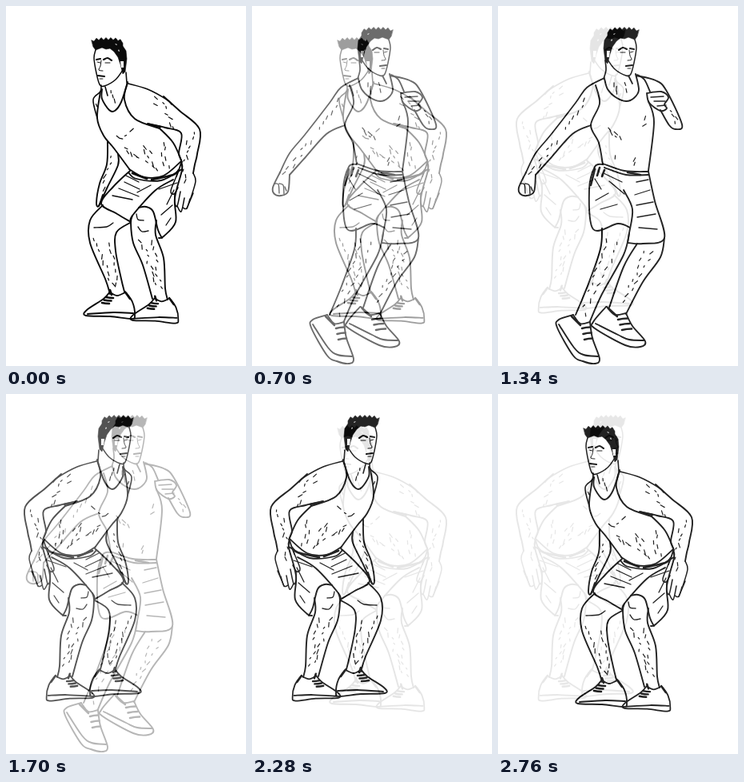
An HTML page for the animation above (2.82 s loop, 300x450 px).

```html
<!DOCTYPE html>
<html lang="en">
<head>
<meta charset="utf-8">
<title>Side hop exercise</title>
<style>
html, body { margin: 0; width: 100%; height: 100%; overflow: hidden; background: #fff; }
svg { display: block; width: 100vw; height: 100vh; }
.ink path { fill: none; stroke: #0b0b0b; stroke-linecap: round; stroke-linejoin: round; }
.ink .solid { fill: #0b0b0b; stroke-width: .6; }
.ink .gap { fill: #fff; stroke: none; }
</style>
</head>
<body>
<svg id="stage" viewBox="0 0 300 450">
  <defs id="defs"></defs>
  <use id="under"/>
  <use id="over"/>
</svg>
<script>
let seed = 7;
const rand = () => (seed = seed * 16807 % 2147483647) / 2147483647;

// Catmull-Rom spline through "x,y x,y ..."
function curve(s) {
  const p = s.split(' ').map(q => q.split(',').map(Number));
  let d = 'M' + p[0];
  for (let i = 0; i < p.length - 1; i++) {
    const a = p[i], b = p[i + 1], before = p[i - 1] || a, after = p[i + 2] || b;
    const c1 = a.map((v, k) => v + (b[k] - before[k]) / 6);
    const c2 = b.map((v, k) => v - (after[k] - a[k]) / 6);
    d += `C${c1} ${c2} ${b}`;
  }
  return d;
}

// Strokes of one weight, separated by "|"
const ink = (width, strokes) => strokes.split('|')
  .map(s => `<path d="${curve(s)}" stroke-width="${width}"/>`).join('');

// Short muscle marks scattered along a line
function marks(x, y, x2, y2, spread, count) {
  const angle = Math.atan2(y2 - y, x2 - x);
  let d = '';
  for (let i = 0; i < count; i++) {
    const k = (i + .5) / count, off = (rand() * 2 - 1) * spread;
    const turn = angle + rand() - .5, len = 2 + rand() * 4;
    const px = x + (x2 - x) * k - Math.sin(angle) * off;
    const py = y + (y2 - y) * k + Math.cos(angle) * off;
    d += `M${px} ${py}l${Math.cos(turn) * len} ${Math.sin(turn) * len}`;
  }
  return `<path d="${d}" stroke-width="1.2"/>`;
}

function laces(x, y, dx, dy, len, tilt) {
  let d = '';
  for (let i = 0; i < 3; i++) d += `M${x + dx * i} ${y + dy * i}q${len / 2} ${tilt} ${len} ${tilt}`;
  return `<path d="${d}" stroke-width="2.6"/>`;
}

function hair() {
  let top = '';
  for (let x = 107, i = 0; x <= 148; x += 3, i++) {
    top += `${x},${39.5 + i % 2 * 3 + 5 * ((x - 126) / 21) ** 4} `;
  }
  return `<path class="solid" d="M${top}146,50 150,56 151,66 149,82 146,85 143,73 140,64 135,57 130,53 125,54 120,52 112,55 109,51Z"/>
    <path class="gap" d="M143,69 147,69 147,77 144,77ZM136,47l3,1l-1,1ZM141,54l1,3l-2,-1Z"/>`;
}

function face() {
  return hair() +
    ink(1.5, '112,55 110,65 113,84 117,98 123,100 137,92 146,80') +
    ink(2.1, '113,67 118,66|122,67 127,65 132,68|115,87 123,88') +
    ink(1, '114,70 118,71|124,71 130,71|119,68 118,75 116,80 121,81|117,91 121,91');
}

const shoe = () =>
  ink(1.9, '130,357 122,366 101,380 100,387 130,388 157,391 161,386 158,370 149,357|102,385 134,383 159,384|130,358 139,362 149,358') +
  laces(120, 371, 2.5, -3.5, 9, 1) +
  ink(2.6, '130,355 132,361|150,359 155,366');

const squatTorso = () =>
  ink(1.6, '124,101 127,112|150,83 151,96|119,99 118,107 109,117 114,140|153,97 177,104 201,117 207,123') +
  ink(1.9, '120,104 120,116 129,130 136,131 144,120 152,95|118,107 114,140 122,162 135,178 155,205|152,96 148,117 161,141 192,153|192,153 209,171 220,195') +
  ink(2.6, '179,148 193,151') +
  marks(128, 104, 136, 119, 2, 3) + marks(136, 161, 145, 166, 1, 2) +
  marks(145, 165, 158, 154, 1, 2) + marks(148, 174, 164, 191, 3, 5) +
  marks(170, 173, 186, 206, 6, 8) + marks(195, 168, 202, 203, 5, 6);

const squatArms = () =>
  ink(1.9, '197,113 217,131 242,154 239,185 236,198 234,209|177,147 199,152 219,159 216,184 219,195 213,213') +
  ink(1.9, '127,169 126,198 117,222 113,246 116,250 121,236|140,185 140,199 127,226 116,250') +
  ink(1.5, '213,213 206,231 210,235 215,227|211,235 211,246 214,250 218,232|214,250 219,257 223,240|221,252 226,253 230,241|234,209 237,219 231,240|226,253 234,234') +
  marks(182, 112, 214, 150, 6, 8) + marks(231, 154, 220, 219, 5, 11) +
  marks(133, 184, 122, 230, 2, 6) + marks(112, 119, 113, 126, 0, 1);

const squatShorts = () =>
  ink(1.8, '154,204 173,214 197,212 219,194|153,208 163,216 194,218 220,204') +
  ink(2.7, '158,209 176,216|182,217 209,211 216,205') +
  ink(1.9, '155,206 134,226 119,247 139,260 156,270|219,194 220,205 211,240 212,270 197,288 191,290|209,217 186,231 158,262 156,270|166,252 175,251 184,257 190,280 195,290') +
  ink(1.3, '150,212 166,220|148,220 167,229|141,228 166,238|133,237 158,242|181,224 164,233|214,221 191,229|210,230 201,248|208,249 194,261|206,265 200,274');

const squatLegs = () =>
  ink(1.9, '121,249 105,268 105,296 124,341 130,360|155,271 138,283 137,306 144,341 148,357|158,262 156,271 159,296 171,324 183,366|188,268 187,286 197,315 199,353 202,367') +
  ink(1.3, '110,277 126,276 134,271|163,260 165,267 172,268|165,276 170,282 178,281') +
  marks(110, 286, 134, 350, 3, 9) + marks(128, 292, 140, 350, 2, 7) +
  marks(167, 288, 187, 350, 3, 9) + marks(180, 289, 194, 355, 3, 8) +
  shoe() + `<g transform="translate(64 29) scale(.94)">${shoe()}</g>`;

const jumpTorso = () =>
  ink(1.7, '134,68 135,80 132,91|163,87 168,97|133,90 111,102 97,121 66,161 47,184 35,208') +
  ink(1.9, '133,91 137,104 147,114 160,119 170,115 176,105 172,85|122,99 127,122 116,149 126,171 131,198|174,86 183,92 190,107|188,119 195,145 188,206') +
  marks(146, 93, 150, 108, 2, 3) + marks(157, 92, 161, 107, 1, 2) +
  marks(137, 150, 153, 165, 3, 5) + marks(178, 153, 186, 140, 2, 2) +
  marks(172, 187, 171, 198, 0, 2) + marks(145, 182, 148, 192, 1, 1);

const jumpArms = () =>
  ink(1.9, '173,87 197,93 210,105 230,148 222,154 214,149 203,130|186,109 204,107 213,114 208,123 211,128 203,131 189,121 186,109') +
  ink(1.4, '191,114 207,113|195,119 209,119|199,125 210,124') +
  ink(1.9, '35,208 26,227 28,235 36,237 45,232 47,211|47,211 66,190 93,160 116,149') +
  ink(1.4, '28,222 33,223 34,234|34,222 39,224 40,235|41,226 43,231') +
  marks(113, 113, 85, 157, 4, 6) + marks(76, 165, 41, 211, 3, 8) +
  marks(215, 128, 223, 146, 4, 4);

const jumpShorts = () =>
  ink(1.8, '131,197 158,206 188,207|133,202 160,211 188,211') +
  ink(2.6, '121,204 116,224|127,202 124,212|162,208 178,211|130,213 133,205') +
  ink(1.9, '131,198 121,201 114,230 119,279 150,272 165,277|188,207 196,244 208,290 181,297 162,296|157,230 168,254 164,284 162,296') +
  ink(1.3, '121,216 129,229|132,209 155,220|139,219 158,235|122,243 138,234|128,254 149,248|173,220 188,217|171,236 190,230|173,249 194,245|174,264 197,260|176,277 199,279');

const jumpLegs = () =>
  ink(1.9, '130,278 128,304 112,350 97,386|164,284 157,311 130,360 115,394|208,290 203,314 181,345 160,385|174,297 157,326 139,377') +
  marks(139, 287, 106, 388, 3, 11) + marks(151, 290, 122, 362, 2, 7) +
  marks(186, 303, 154, 371, 3, 8) + marks(196, 302, 166, 357, 2, 6);

const jumpShoes = () =>
  ink(1.9, '94,386 76,392 74,402 94,437 106,444 121,447 127,441 118,415 115,395|76,398 95,427 107,436 125,438|94,386 103,397 115,395') +
  ink(1.9, '135,376 119,395 121,403 159,424 178,426 184,419 168,400 160,384|122,397 150,411 164,417 183,418|136,376 146,386 160,384') +
  ink(2.6, '92,388 103,399|138,378 149,388') +
  laces(105, 403, 1.5, 7, 10, -1.5) + laces(150, 392, 2.5, 6.5, 12, -1.5);

const mirror = (x, y, body) => `<g transform="translate(${x} ${y}) scale(-1 1)">${body}</g>`;
const pose = (i, body) =>
  `<g id="pose${i}" class="ink"><rect width="300" height="450" fill="#fff"/>${body}</g>`;

const head = face();
const squat = head + squatTorso() + squatArms() + squatShorts() + squatLegs();
const jump = jumpTorso() + jumpArms() + jumpShorts() + jumpLegs() + jumpShoes();
document.getElementById('defs').innerHTML =
  pose(0, squat) + pose(1, mirror(283, -13, head) + jump) + pose(2, mirror(266, -13, squat));

const HOLD = 400, STEP = 60, SPAN = 940, POSES = 3;
const under = document.getElementById('under');
const over = document.getElementById('over');
const start = performance.now();

function show() {
  const t = (performance.now() - start) % (SPAN * POSES);
  const i = Math.floor(t / SPAN);
  const late = t % SPAN - HOLD;
  under.setAttribute('href', '#pose' + i);
  over.setAttribute('href', '#pose' + (i + 1) % POSES);
  over.setAttribute('opacity', late < 0 ? 0 : (Math.floor(late / STEP) + 1) / 10);
  requestAnimationFrame(show);
}
show();
</script>
</body>
</html>
```
